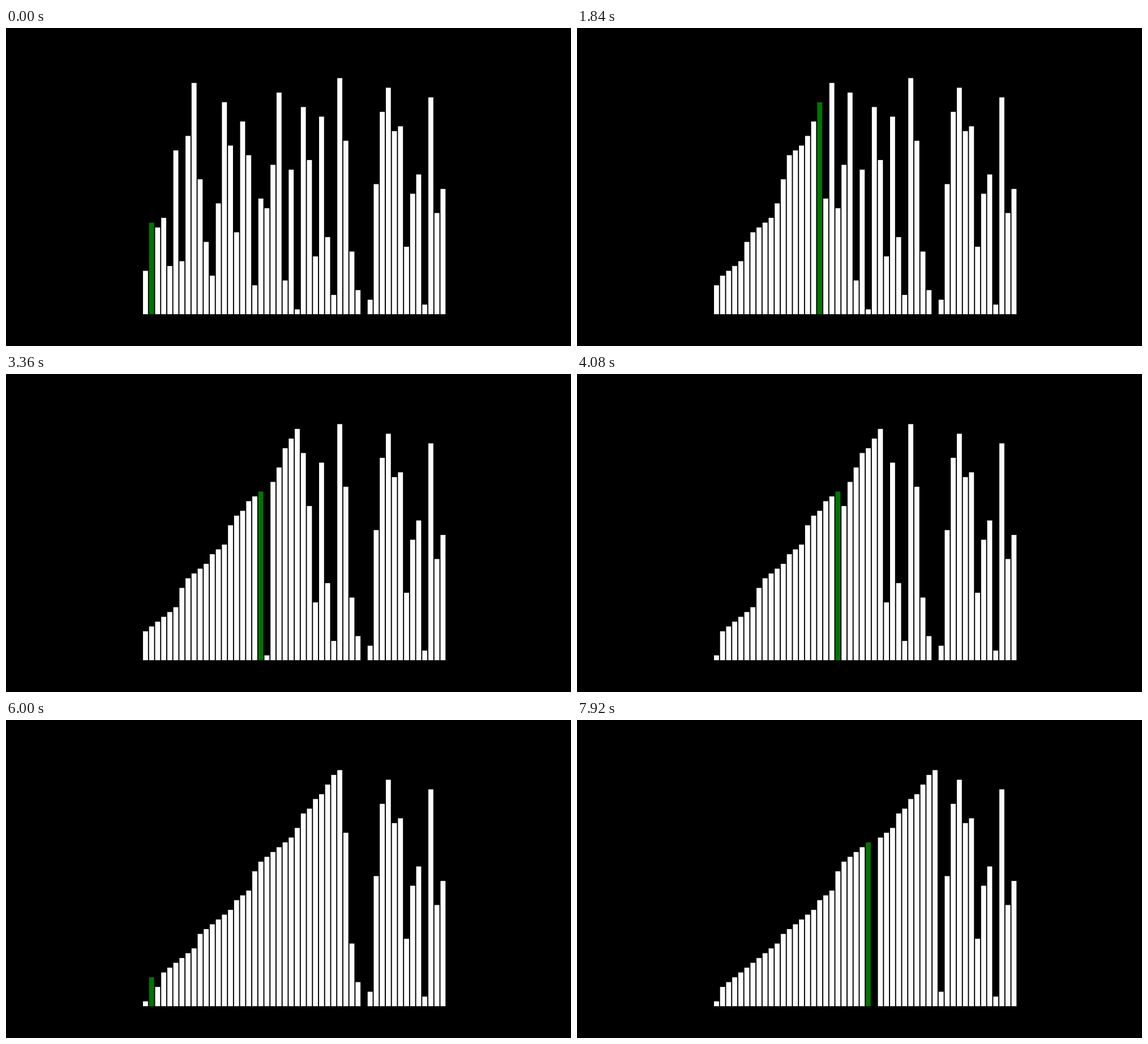
These frames come from a looping animation (998 px wide and 561 px high, 8000 ms). A matplotlib script:

```python
import matplotlib.pyplot as plt
import numpy as np
from matplotlib.animation import FuncAnimation

WIDTH, HEIGHT, DPI = 998, 561, 100
FRAMES, INTERVAL = 100, 80
LEFT, PITCH, BAR_WIDTH = 242.0, 10.724, 8.8
BASE, UNIT = 504.9, 8.5
WHITE, GREEN = "#fefefe", "#007500"
SWAPS_PER_FRAME, START_DELAY = 3.234, 0.2

# The shuffled numbers to sort; everything else follows from the algorithm.
VALUES = [9, 19, 18, 20, 10, 34, 11, 37, 48, 28,
          15, 8, 23, 44, 35, 17, 40, 33, 6, 24,
          22, 31, 46, 7, 30, 1, 43, 32, 12, 41,
          16, 4, 49, 36, 13, 5, 0, 3, 27, 42,
          47, 38, 39, 14, 25, 29, 2, 45, 21, 26]


def insertion_sort(values):
    """Return the array and the marked index after every swap."""
    a = list(values)
    states = [(a.copy(), 1)]
    for i in range(1, len(a)):
        j = i - 1
        while j >= 0 and a[j] > a[j + 1]:
            a[j], a[j + 1] = a[j + 1], a[j]
            j -= 1
            states.append((a.copy(), j % len(a)))
    return states


states = insertion_sort(VALUES)

fig = plt.figure(figsize=(WIDTH / DPI, HEIGHT / DPI), dpi=DPI, facecolor="black")
ax = fig.add_axes([0, 0, 1, 1])
ax.axis("off")
bars = ax.bar(LEFT + PITCH * np.arange(len(VALUES)), np.zeros(len(VALUES)),
              BAR_WIDTH, bottom=BASE, align="edge", linewidth=0, snap=False)
ax.set_xlim(0, WIDTH)
ax.set_ylim(HEIGHT, 0)


def draw(frame):
    swaps = max(0, int(SWAPS_PER_FRAME * frame - START_DELAY))
    values, marked = states[swaps]
    for k, (bar, value) in enumerate(zip(bars, values)):
        bar.set_height(-UNIT * value)
        bar.set_facecolor(GREEN if k == marked else WHITE)
    return list(bars)


anim = FuncAnimation(fig, draw, frames=FRAMES, interval=INTERVAL,
                     repeat=True, repeat_delay=0, blit=False)
plt.show()
```
